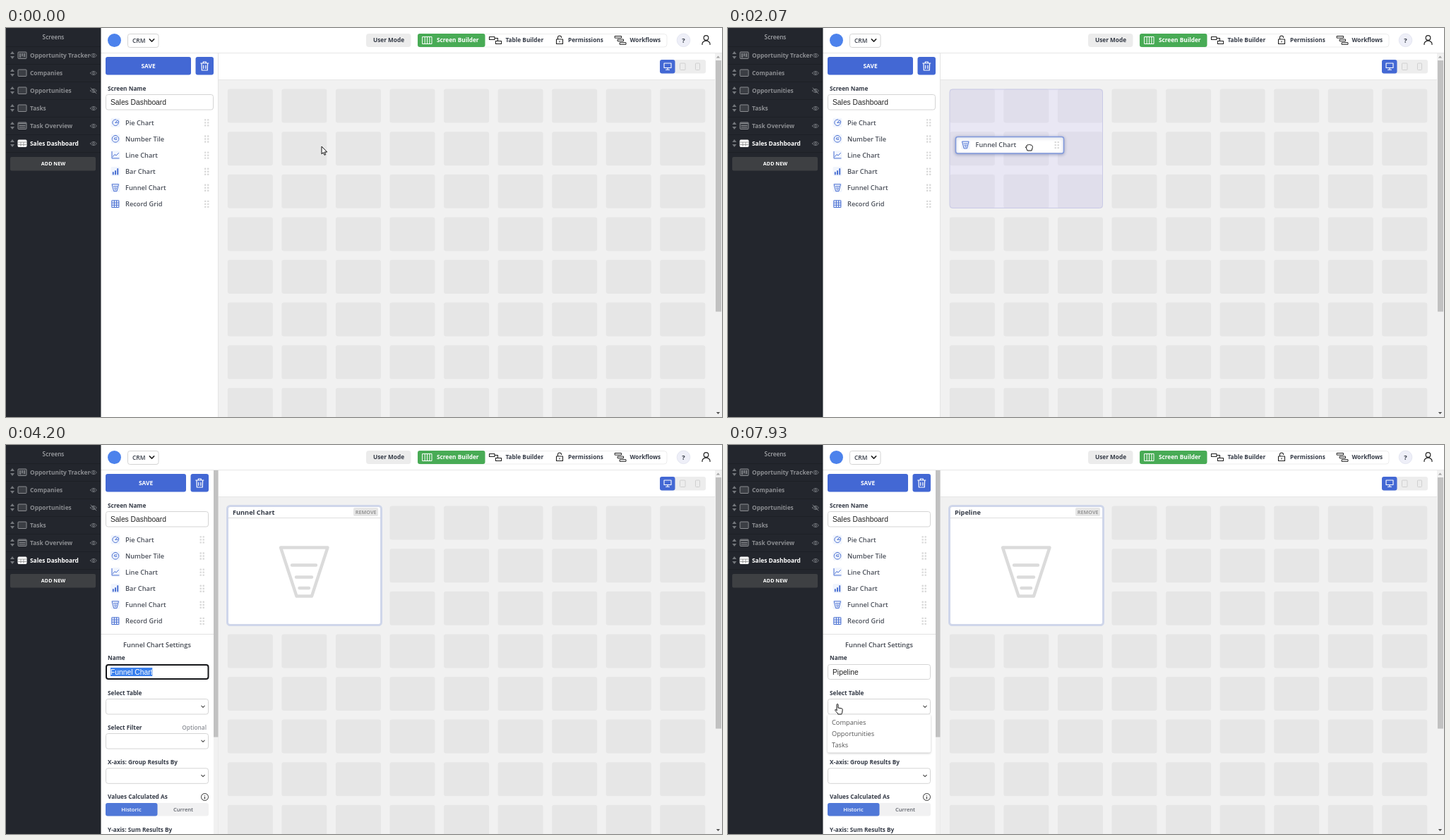
An HTML page with a canvas that plays this animation: 1014x552 px, repeating every 8 s.

```html
<!DOCTYPE html>
<html lang="en">
<head>
<meta charset="utf-8">
<title>Screen builder</title>
<style>
html, body { margin: 0; width: 100%; height: 100%; overflow: hidden; background: #fff; }
canvas { display: block; }
</style>
</head>
<body>
<canvas id="stage" width="1014" height="552"></canvas>
<script>
const ctx = document.getElementById('stage').getContext('2d');
const SANS = '"Open Sans", "Noto Sans", sans-serif';
const ARIAL = '"Liberation Sans", Arial, sans-serif';
const BLUE = '#4368d4', ICON = '#4a70d2', INK = '#343a46', LINE = '#d4d4d4';
const LOOP = 8000, TICK = 200 / 3;

// ---- drawing helpers ----
function box(x, y, w, h, r, fill, stroke, lw = 1) {
  ctx.beginPath();
  ctx.roundRect(x, y, w, h, r);
  if (fill) { ctx.fillStyle = fill; ctx.fill(); }
  if (stroke) { ctx.strokeStyle = stroke; ctx.lineWidth = lw; ctx.stroke(); }
}

function path(d, x, y, stroke, lw = 1, fill) {
  const p = new Path2D(d);
  ctx.save();
  ctx.translate(x, y);
  ctx.lineCap = ctx.lineJoin = 'round';
  if (fill) { ctx.fillStyle = fill; ctx.fill(p); }
  if (stroke) { ctx.strokeStyle = stroke; ctx.lineWidth = lw; ctx.stroke(p); }
  ctx.restore();
}

function disc(x, y, r, fill, stroke, lw = 1) {
  box(x - r, y - r, 2 * r, 2 * r, r, fill, stroke, lw);
}

// y is the middle of the capitals
function text(s, x, y, size = 8.25, weight = 700, color = INK, align = 'left', family = SANS) {
  ctx.font = `${weight} ${size}px ${family}`;
  ctx.textAlign = align;
  ctx.fillStyle = color;
  ctx.fillText(s, x, y + size * 0.36);
}

function shadow(color, blur, draw) {
  ctx.save();
  ctx.shadowColor = color;
  ctx.shadowBlur = blur;
  ctx.shadowOffsetY = 1;
  draw();
  ctx.restore();
}

const fieldText = (s, y, color = '#222') => text(s, 148, y, 10.3, 400, color, 'left', ARIAL);
const chevron = (x, y, s, color, lw) => path(`M${-s} ${-s / 2}L0 ${s / 2}L${s} ${-s / 2}`, x, y, color, lw);

// ---- sidebar ----
const screens = ['Opportunity Tracker', 'Companies', 'Opportunities', 'Tasks', 'Task Overview', 'Sales Dashboard'];

function sidebar() {
  box(0, 0, 134.5, 552, 0, '#23262d');
  text('Screens', 67, 13.5, 8.25, 600, '#a4a6aa', 'center');
  screens.forEach((name, i) => {
    const y = 38.5 + 25 * i, active = i === 5;
    const tone = active ? '#fff' : '#8b8d91';
    box(0, y - 12.5, 134, 1, 0, '#1d2026');
    path('M-3 -1.5L0 -5.5L3 -1.5ZM-3 1.5L0 5.5L3 1.5Z', 9, y, null, 0, '#74777c');
    box(17, y - 4.5, 12, 9.5, 1, active ? '#fff' : '#3b3e44', tone);
    if (i === 0) path('M20 -2V3M23 -2V1M26 -2V2', 0, y, tone, 1.5);
    if (i === 4) path('M18 -3H28M19 0H27M19 2.5H27', 0, y, tone, 1);
    if (active) path('M17.5 -1.5H28.5M17.5 2H28.5M21 -1V4M25 -1V4', 0, y, '#777', 0.7);
    text(name, 34, y, 8.4, 700, tone);
    path('M-4.5 0Q0 -5.5 4.5 0Q0 5.5 -4.5 0Z', 124, y + 0.5, '#777a7f', 0.9);
    disc(124, y + 0.5, 1.4, null, '#777a7f', 0.9);
    if (i === 2) path('M-4 -4L4 4', 124, y + 0.5, '#777a7f', 1);
  });
  box(0, 176, 134, 1, 0, '#1d2026');
  box(6, 183, 121, 19.5, 2, '#3e4043');
  text('ADD NEW', 67, 192.7, 7.2, 700, '#fff', 'center');
}

// ---- top bar ----
function header() {
  box(134, 0, 880, 35.5, 0, '#fff');
  box(134, 35, 880, 1, 0, '#e6e6e6');
  disc(153.5, 17.5, 9.5, '#4c82ec');
  box(172.5, 8.5, 43.5, 19, 3, '#fff', LINE);
  text('CRM', 179, 17.7, 8.4, 600);
  chevron(206.5, 17.5, 3.2, '#222', 1.5);

  box(510, 8, 63.5, 19, 4, '#ececec');
  text('User Mode', 542, 17.4, 8.25, 700, INK, 'center');
  box(583.5, 8.5, 352.5, 18.5, 4, '#fff', '#ededed');
  box(583, 8, 95.5, 19, 3, '#48ab55');
  path('M0 0H13V10H0ZM3.2 0V10M6.5 0V10M9.8 0V10', 590, 12.5, '#fff', 1);
  text('Screen Builder', 610, 17.4, 8.25, 700, '#fff');
  path('M0 0H7.5V4H0ZM9 6H17V10H9ZM7.5 2H12V6', 684.5, 12.5, '#222', 1.1);
  text('Table Builder', 707.5, 17.4);
  path('M0 5H9V11.5H0ZM2 5V2.5Q2 0 4.5 0Q7 0 7 2.5M4.5 7.7V9', 779.5, 11, '#222', 1.1);
  text('Permissions', 796, 17.4);
  path('M0 0H9V2.6H0ZM4 4.6H12V7.2H4ZM7 9.2H15.5V11.8H7Z', 862.5, 11.5, '#222', 1);
  text('Workflows', 883.5, 17.4);
  disc(959.5, 17.3, 9.3, '#eeeff8', '#dfe1ee', 0.8);
  text('?', 959.5, 17.3, 9.3, 700, INK, 'center');
  disc(991.5, 14, 3.3, null, '#222', 1.2);
  path('M-5.5 0V-1A5.5 4.3 0 0 1 5.5 -1V0', 991.5, 23.5, '#222', 1.2);
}

// ---- canvas area ----
const COL = 76.56, ROW = 60.6, LEFT = 314, TOP = 87;

function board() {
  box(300, 36, 714, 516, 0, '#f1f1f1');
  for (let r = 0; r < 8; r++)
    for (let c = 0; c < 9; c++)
      box(LEFT - 0.2 + c * COL, TOP - 0.4 + r * ROW, 64, 48, 3, '#e6e6e6');
}

function toolbar() {
  box(301, 36, 703, 37, 0, '#fff');
  box(301, 73, 703, 1, 0, '#e6e6e6');
  box(926, 45, 65, 19.5, 3, '#ededed');
  box(926, 45, 21.5, 19.5, 3, BLUE);
  path('M0 0H10V6.5H0ZM5 6.5V9M2.5 9.3H7.5', 932, 50, '#fff', 1.1);
  box(954.5, 50, 7.5, 9.5, 1, null, '#d0d0d0');
  box(976.5, 50, 6, 9.5, 1, null, '#d0d0d0');
  box(1004, 36, 10, 516, 0, '#f1f1f1');
  box(1005, 46, 8, 356.5, 0, '#c1c1c1');
  path('M-2.6 1.4L0 -1.4L2.6 1.4Z', 1008.5, 41, null, 0, '#a3a3a3');
  path('M-2.6 -1.4L0 1.4L2.6 -1.4Z', 1008.5, 546.5, null, 0, '#505050');
}

// The 3 x 3 drop zone is centred on the cell below the cursor.
function dropZone(x, y) {
  if (x < 301) return;
  const c = Math.floor((x - LEFT) / COL) - 1, r = Math.floor((y - TOP) / ROW) - 1;
  box(LEFT + c * COL, TOP + r * ROW, 216.5, 168.5, 4, 'rgba(200,188,255,.2)', '#c9c9e6');
}

function card(title) {
  box(313.5, 86.5, 218, 169, 4, '#fff', '#cfd6ea', 3);
  text(title, 321, 95.4, 9.2);
  box(492, 89, 35, 12, 2, '#e6e6e6');
  text('REMOVE', 509.7, 95, 7.2, 700, '#9a9a9a', 'center');
  box(315, 103, 215, 1, 0, '#dedede');
  path('M389 145.5H455.5L433 214.5H411.5ZM405 170.5H439M411 187.5H433M415.5 203H429', 0, 0, '#dbdbdb', 4.4);
}

// ---- left panel ----
const widgets = ['Pie Chart', 'Number Tile', 'Line Chart', 'Bar Chart', 'Funnel Chart', 'Record Grid'];
const glyphs = [
  'M1 -4.2A4.3 4.3 0 1 0 4.3 1M0 0L3.2 -3.6A4.6 4.6 0 0 1 4.8 -.6Z',
  'M0 -4.8A4.8 4.8 0 1 1 -.01 -4.8',
  'M-5 -5V4.5H5M-3.5 2L-1 -1L1 .5L4.5 -3',
  'M-3.2 1.5V4M0 -.5V4M3.2 -3.5V4',
  'M-4.5 -4.8H4.5L2 5H-2ZM-2.5 -1.8H2.5M-1.6 .6H1.6M-1 2.7H1',
  'M-4.8 -4.8H4.8V4.8H-4.8ZM-1.6 -4.8V4.8M1.6 -4.8V4.8M-4.8 -1.6H4.8M-4.8 1.6H4.8'
];

function widget(i, x, y, dots) {
  box(x + 7.5, y - 6.5, 13, 13, 2, '#f1f5fd');
  path(glyphs[i], x + 14, y, ICON, i === 3 ? 2 : 1);
  if (i === 1) text('42', x + 14, y, 4.4, 700, ICON, 'center');
  text(widgets[i], x + 28, y, 9.25, 600, '#4a4f59');
  for (let k = 0; k < 6; k++)
    box(x + dots - 3 + 4 * (k % 2), y - 5 + 4 * (k >> 1), 2.4, 2.4, 0.5, '#dadada');
}

function panel(open) {
  const w = open ? 146 : 153, right = 141 + w;
  box(134, 36, 166.5, 516, 0, '#fff');
  box(300, 36, 1, 516, 0, '#e4e4e4');
  box(141, 41, w - (open ? 32 : 32), 25.5, 3, BLUE);
  text('SAVE', 141 + (w - 32) / 2, 54, 8.4, 700, '#fff', 'center');
  box(right - 25.5, 41, 25.5, 25.5, 3, BLUE);
  path('M-5.5 -4H5.5M-2 -4V-6H2V-4M-4.3 -4L-4 6H4L4.3 -4M-1.6 -1V3.5M1.6 -1V3.5', right - 12.7, 54, '#fff', 1.2);
  text('Screen Name', 144, 86.3);
  box(141.5, 94.5, w - 1, 21.5, 3, '#fff', LINE);
  fieldText('Sales Dashboard', 105.5);
  widgets.forEach((_, i) => widget(i, 141, 134.2 + 23.1 * i, open ? 136.5 : 143));
  if (open) {
    box(294, 36, 6.5, 516, 0, '#f1f1f1');
    box(294, 36, 6.5, 378.5, 0, '#c1c1c1');
  }
}

function select(label, y) {
  text(label, 144, y);
  box(141.5, y + 8.5, 145, 21.5, 3, '#fff', LINE);
  chevron(279, y + 19.3, 2.2, '#555', 1.2);
}

function settings(name, focused, markFrom, caret) {
  box(134.5, 268, 159.5, 1, 0, '#e2e2e2');
  text('Funnel Chart Settings', 214, 283.2, 9.25, 600, '#41464f', 'center');
  text('Name', 144, 302.5);
  if (focused) box(142, 312, 144.5, 20, 3, '#fff', '#15161a', 2);
  else box(141.5, 311.5, 145, 21, 3, '#fff', LINE);
  fieldText(name, 322);
  const end = 148 + ctx.measureText(name).width;
  if (markFrom < end) {
    ctx.save();
    ctx.beginPath();
    ctx.rect(markFrom, 316, end - markFrom, 12);
    ctx.clip();
    box(markFrom, 316, end - markFrom, 12, 0, '#3a80ee');
    fieldText(name, 322, '#fff');
    ctx.restore();
  }
  if (caret) box(Math.round(end - 0.5), 316, 1, 11, 0, '#111');

  select('Select Table', 352);
  select('Select Filter', 401);
  text('Optional', 284, 401, 8.3, 600, '#8d9097', 'right');
  select('X-axis: Group Results By', 450.3);
  text('Values Calculated As', 144, 499.5);
  disc(281.5, 499.5, 5, null, '#333', 1);
  path('M0 -.3V2.4M0 -2.3V-2.2', 281.5, 499.5, '#333', 1.1);
  box(141, 508, 146, 18.5, 3, '#f1f1f2');
  box(141, 508, 73.5, 18.5, 3, '#5078d8');
  text('Historic', 177.5, 517.3, 7.6, 600, '#fff', 'center');
  text('Current', 251, 517.3, 7.6, 600, '#60646c', 'center');
  text('Y-axis: Sum Results By', 144, 545.7);
}

function menu(alpha) {
  ctx.save();
  ctx.globalAlpha = alpha;
  shadow('rgba(0,0,0,.25)', 3, () => box(141, 382.5, 146, 54, 2, '#fff'));
  ['Companies', 'Opportunities', 'Tasks'].forEach((s, i) => text(s, 147, 393.8 + 16 * i, 9.25, 400, '#555'));
  ctx.restore();
}

// ---- cursor ----
const cursors = {
  arrow: 'M0 0V10.3L2.4 8.1L4 11.8L5.7 11.1L4.1 7.5H7.3Z',
  hand: 'M-1 8.5V.5C-1 -.8 1 -.8 1 .5V5L5.8 5.8Q7.2 6.1 7.2 7.4L6.8 11Q6.4 12.6 5.8 14H.8C0 11.5 -3 9.8 -3.3 8.3C-3.5 7 -2 6.9 -1 8.5Z',
  grab: 'M-3.5 1.5L-5.3 -.8C-6.2 -2 -4.6 -2.9 -3.7 -1.8L-3 -1L-3.8 -4C-4 -5.5 -2.4 -5.7 -2 -4.4L-1.3 -2L-1.2 -5.3C-1.1 -6.7 .6 -6.7 .7 -5.3L.8 -2L1.6 -4.8C2 -6.1 3.6 -5.7 3.3 -4.3L2.9 -1.5L4 -3.2C4.7 -4.3 6 -3.6 5.5 -2.3L4 3L3.3 6H-2C-2.4 4 -2.6 3 -3.5 1.5Z',
  fist: 'M-4.5 0C-5 -2 -3.5 -2.5 -3 -1.5V-3C-2.6 -4.4 -1 -4 -.8 -3.5C0 -4.6 1.3 -4.2 1.5 -3.4C2.6 -4 3.6 -3.3 3.6 -2.5C4.8 -2.6 5 -1.5 4.8 0L3.5 4.5H-2.5C-3 2.8 -4.2 1.5 -4.5 0Z',
  beam: 'M-2 -5.5H2M0 -5.5V5.5M-2 5.5H2'
};

function cursorKind(x, y, t) {
  const within = (l, top, r, b) => x >= l && x <= r && y >= top && y <= b;
  if (t >= 1200 && t < 2400) return 'fist';
  if (t > 4000 && t < 4300) return 'beam';
  if (within(141, 122, 294, 261)) return 'grab';
  if (t < 2400) return 'arrow';
  if (within(312, 85, 533, 257)) return 'grab';
  if (within(141, 311, 287, 333)) return 'beam';
  if (within(141, 360, 287, 382)) return 'hand';
  return 'arrow';
}

function cursor(x, y, t) {
  const kind = cursorKind(x, y, t);
  path(cursors[kind], x, y, '#111', 1, kind === 'beam' ? null : '#fff');
}

const smooth = u => u * u * (3 - 2 * u), speedUp = u => u * u, slowDown = u => u * (2 - u);
// time, x, y and the easing that leads there
const route = [
  [467, 447, 168.5], [1067, 247, 231, smooth],
  [1200, 247, 231, smooth], [1667, 363, 213, speedUp], [2067, 426.5, 169.5, slowDown], [2133, 428, 166, smooth],
  [2800, 428, 166, smooth], [3333, 171, 383, smooth],
  [3400, 171, 383, smooth], [3867, 210, 322.5, smooth],
  [4000, 210, 322.5, smooth], [4200, 63, 322.5, smooth],
  [6600, 22, 345, smooth], [7067, 149, 361.5, smooth],
  [7867, 149, 361.5, smooth], [7933, 155, 368, smooth]
];

function place(t) {
  const i = route.findIndex(k => k[0] > t);
  if (i === 0) return route[0].slice(1, 3);
  if (i < 0) return route[route.length - 1].slice(1, 3);
  const [t0, x0, y0] = route[i - 1], [t1, x1, y1, ease] = route[i];
  const u = ease((t - t0) / (t1 - t0));
  return [x0 + (x1 - x0) * u, y0 + (y1 - y0) * u];
}

// ---- timeline ----
const keys = [4870, 5070, 5130, 5270, 5330, 5470, 5530, 5730];

function draw(ms) {
  const t = Math.floor((ms + 4) / TICK) * TICK + 0.5;
  const [x, y] = place(t);
  const dragging = t >= 1260 && t < 2395;
  const dropped = t >= 2395, open = t >= 2460;
  const typed = keys.filter(k => k <= t + 4).length;
  const name = typed ? 'Pipeline'.slice(0, typed) : 'Funnel Chart';
  const focused = t >= 4060 && t < 7325;
  const markFrom = focused && !typed ? Math.max(148, x) : 999;
  const caret = focused && typed && (t < 6260 || t >= 6790);

  board();
  if (dragging) dropZone(x, y);
  toolbar();
  if (dropped) card(name);
  panel(open);
  if (open) settings(name, focused, markFrom, caret);
  header();
  sidebar();
  if (dragging) {
    const left = x - 106, top = y - 16;
    shadow('rgba(40,60,120,.35)', 4, () => box(left + 2, top + 1, 153, 23.5, 3, '#fff', '#7f98dc', 1.5));
    widget(4, left + 2, top + 12.4, 143);
  }
  if (t >= 7325) menu(Math.min(1, (t - 7266) / (3 * TICK)));
  if (t < 4195 || t >= 6660) cursor(x, y, t);
}

const start = performance.now();
function frame() {
  draw((performance.now() - start) % LOOP);
  requestAnimationFrame(frame);
}
frame();
</script>
</body>
</html>
```
